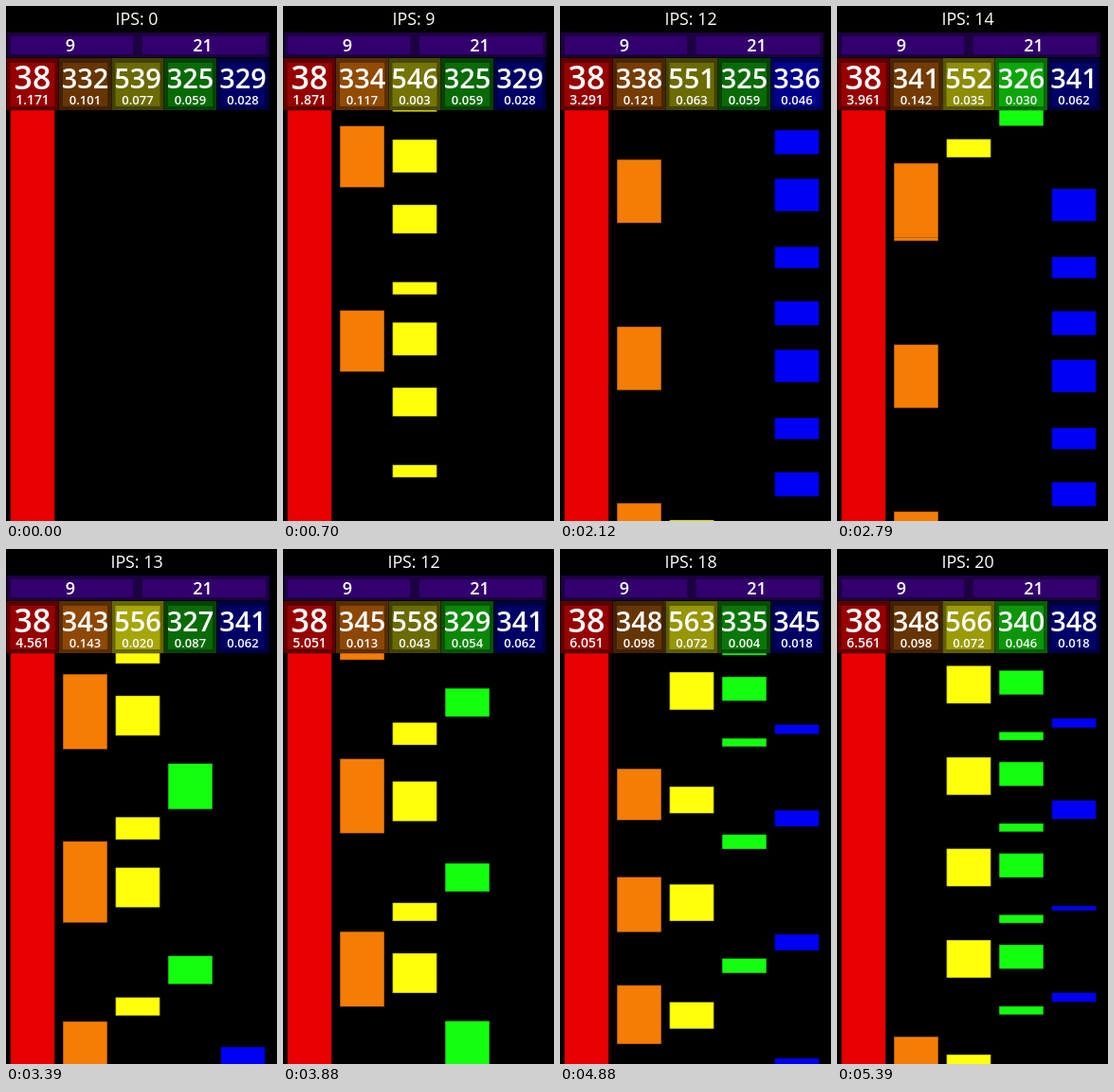
Write an HTML page with a canvas that moves like this. It is 286 px wide and 544 px high and loops after 5.42 s.

```html
<!DOCTYPE html>
<html>
<head>
<meta charset="utf-8">
<style>
html, body { margin: 0; width: 100%; height: 100%; overflow: hidden; background: #000; }
canvas { display: block; }
</style>
</head>
<body>
<canvas id="stage" width="286" height="544"></canvas>
<script>
const ctx = document.getElementById('stage').getContext('2d');
const LOOP = 5420, LEAD = 14, SPEED = 0.555;
const TOP = 110, WIDTH = 47, PITCH = 55.5;

// A steady run of presses; hold lengths repeat in turn.
const run = (start, step, n, ...holds) =>
  Array.from({ length: n }, (_, i) => ({ press: start + i * step, hold: holds[i % holds.length] }));

const key = (rgb, count, last, scale, ...runs) =>
  ({ rgb, count, last, scale, notes: runs.flat().sort((a, b) => a.press - b.press) });

const keys = [
  key([232, 0, 0], 37, 0, 1.07, run(-1156, 0, 1, 9999)),
  key([245, 125, 5], 332, 101, 1,
    run(217, 351, 4, 117), run(1602, 318, 4, 121),
    run(2562, 330, 5, 142, 155, 143), run(4151, 213, 3, 112, 105, 98)),
  key([255, 255, 10], 539, 77, 1,
    run(16, 116, 12, 24, 55, 63), run(2921, 327, 4, 76),
    run(2715, 335, 4, 35, 43), run(4180, 205, 3, 51, 70), run(4787, 174, 4, 72)),
  key([20, 255, 15], 325, 59, 1,
    run(2775, 333, 4, 54, 87, 54), run(4050, 236, 3, 28), run(4717, 87, 8, 16, 46)),
  key([0, 0, 245], 329, 28, 1,
    run(1400, 108.5, 12, 46, 41, 62), run(4093, 236, 3, 31), run(4741, 174, 4, 18, 9, 36))
];

function rect(color, x, y, w, h) {
  ctx.fillStyle = color;
  ctx.fillRect(x, y, w, h);
}

function text(str, x, y, size, weight) {
  ctx.font = `${weight} ${size}px "Open Sans", "Noto Sans", sans-serif`;
  ctx.fillStyle = '#fff';
  ctx.fillText(str, x, y);
}

const shade = (rgb, k) => `rgb(${rgb.map(v => Math.round(v * k))})`;

function drawBar(rgb, x, top, bottom) {
  rect(shade(rgb, 0.6), x, top, WIDTH, bottom - top);
  rect(shade(rgb, 1), x + 0.7, top + 0.5, WIDTH - 1.4, Math.max(0, bottom - top - 1));
}

function drawKey({ rgb, count, last, scale, notes }, x, now) {
  const played = notes.filter(n => n.press <= now);
  for (const { press, hold } of played) {
    drawBar(rgb, x, TOP + SPEED * Math.max(0, now - press - hold), TOP + SPEED * (now - press));
  }

  let shown = last, glow = 0;
  if (played.length) {
    const { press, hold } = played[played.length - 1];
    const held = now - press;
    shown = Math.min(held, hold);
    glow = held < hold ? Math.min(1, held / 20) : Math.max(0, 1 - (held - hold) / 130);
  }
  const level = 0.42 + 0.23 * glow;
  rect(shade(rgb, level * 0.62), x - 4, 55, PITCH - 0.5, 55);
  rect(shade(rgb, level), x, 60, WIDTH, 46);
  const mid = x + WIDTH / 2;
  text(count + played.length, mid, 87 + (scale > 1 ? 1 : 0), scale > 1 ? 34 : 29, 600);
  text((shown / 1000).toFixed(3), mid, 104, 13 * scale, 600);
}

function draw() {
  const now = performance.now() % LOOP + LEAD;
  rect('#000', 0, 0, 286, 544);
  ctx.textAlign = 'center';

  const recent = keys.flatMap(k => k.notes).filter(n => n.press <= now && n.press > now - 1000);
  text('IPS: ' + recent.length, 138, 20, 17.8, 400);

  rect('#1c0042', 1, 28, 277, 26);
  rect('#32006e', 5, 32, 129, 19);
  rect('#32006e', 144, 32, 130, 19);
  text('9', 68, 47.5, 18, 600);
  text('21', 207.5, 47.5, 18, 600);

  keys.forEach((k, i) => drawKey(k, 4.5 + PITCH * i, now));
  requestAnimationFrame(draw);
}
draw();
</script>
</body>
</html>
```
